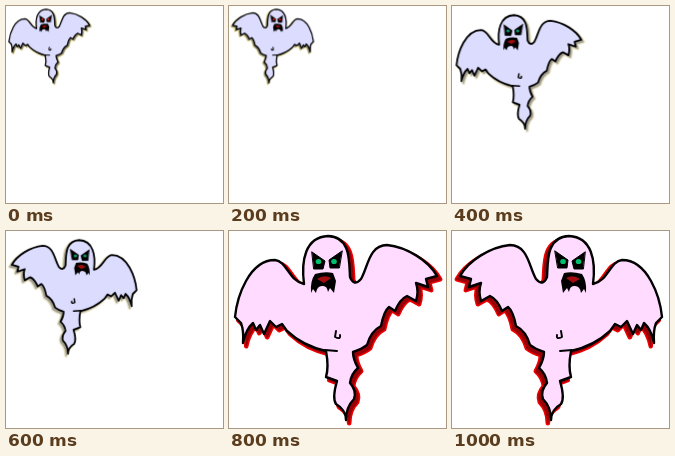
An HTML page for the animation above (1200 ms loop, 217 by 197 pixels).

```html
<!DOCTYPE html>
<html lang="en">
<head>
<meta charset="utf-8">
<title>Flapping ghost</title>
<style>
html, body { margin: 0; width: 100%; height: 100%; overflow: hidden; background: #fff; }
svg { display: block; width: 217px; height: 197px; }
g { stroke-linejoin: round; stroke-linecap: round; }
</style>
</head>
<body>
<svg id="stage" viewBox="0 0 217 197"></svg>
<script>
const LOOP = 1200;
const WIDTH = 216;

const body = `M6 86 C8 66 20 29 46 29 C58 30 60 50 75 53
  C72 30 76 6 99 5 C122 6 120 30 121 46 Q125 56 132 48
  C139 36 140 14 158 14 C178 16 200 30 208 45
  L197 48 L199 56 L187 52 Q190 60 187 70 L178 65 Q171 68 166 80
  L160 76 Q155 80 152 95 Q142 100 138 114 Q133 118 124 121
  Q124 128 129 137 Q122 143 121 152 Q128 160 125 168 Q117 176 117 189
  Q117 179 107 173 Q103 167 108 150 L97 146 Q100 136 97 120
  Q74 115 58 100 L53 93 L47 96 L41 90 L35 103 L31 94 L27 99
  L24 92 Q17 98 14 112 Q15 100 12 92 Z`;
const belly = 'M96 119 L108 120 M107 100 L106 106 Q112 109 111 104';
const eyes = 'M83 21 L96 30 L94 38 L85 38 Z M113 20 L100 29 L101 37 L110 37 Z';
const mouth = `M86 43 Q96 40 104 42 L107 50 L105 62 L101 57 L99 61
  Q98 54 93 55 Q88 55 87 62 L84 58 L82 62 Q81 50 86 43 Z`;

const lilac = '#dcdcff', pink = '#ffdcff';
const warm = ['#e9dfa0', '#807c68'], pale = ['#e8e2c4', '#a5a294'], blood = ['#f00000', '#980008'];

// Each size shows twice: as drawn, then mirrored.
const sizes = [
  { scale: .4, x: .5, y: 1.2, line: 1.3, fill: lilac, shade: warm, drop: 1.2, eye: '#d81818' },
  { scale: .618, x: .8, y: 6, line: 1.8, fill: lilac, shade: pale, drop: 2, eye: '#109068' },
  { scale: 1, x: 0, y: 0, line: 2.4, fill: pink, shade: blood, drop: 3.2, eye: '#00c070' }
];
const steps = sizes.flatMap(size => [{ ...size, flip: false }, { ...size, flip: true }]);

function add(parent, tag, attrs) {
  const el = document.createElementNS('http://www.w3.org/2000/svg', tag);
  for (const key in attrs) el.setAttribute(key, attrs[key]);
  return parent.appendChild(el);
}

function addGhost({ scale, x, y, line, fill, shade, drop, eye, flip }) {
  const left = flip ? x + WIDTH * scale : x;
  const ghost = add(document.getElementById('stage'), 'g', {
    transform: `translate(${left} ${y}) scale(${flip ? -scale : scale} ${scale})`, opacity: 0
  });
  const width = line / scale;
  const path = attrs => add(ghost, 'path', attrs);
  const shift = `translate(${drop / scale} ${drop / scale})`;
  path({ d: body, transform: shift, fill: shade[0], stroke: shade[0], 'stroke-width': width * 1.9 });
  path({ d: body, transform: shift, fill: shade[1], stroke: shade[1], 'stroke-width': width * .6 });
  path({ d: body, fill, stroke: '#000', 'stroke-width': width });
  path({ d: belly, fill: 'none', stroke: '#000', 'stroke-width': width * .8 });
  path({ d: eyes, stroke: '#000', 'stroke-width': 1 });
  for (const cx of [89.5, 105]) add(ghost, 'ellipse', { cx, cy: 30.5, rx: 2.8, ry: 2.6, fill: eye });
  path({ d: mouth });
  path({ d: 'M88 48 Q95 43 102 47 L95 52 Z', fill: '#a00c10' });
  return ghost;
}

steps.forEach((step, i) => {
  const keys = [
    { opacity: 0, offset: 0 },
    { opacity: 1, offset: i / steps.length },
    { opacity: 0, offset: (i + 1) / steps.length },
    { opacity: 0, offset: 1 }
  ].map(key => ({ ...key, easing: 'step-end' }));
  addGhost(step).animate(keys, { duration: LOOP, iterations: Infinity }).startTime = 0;
});
</script>
</body>
</html>
```
